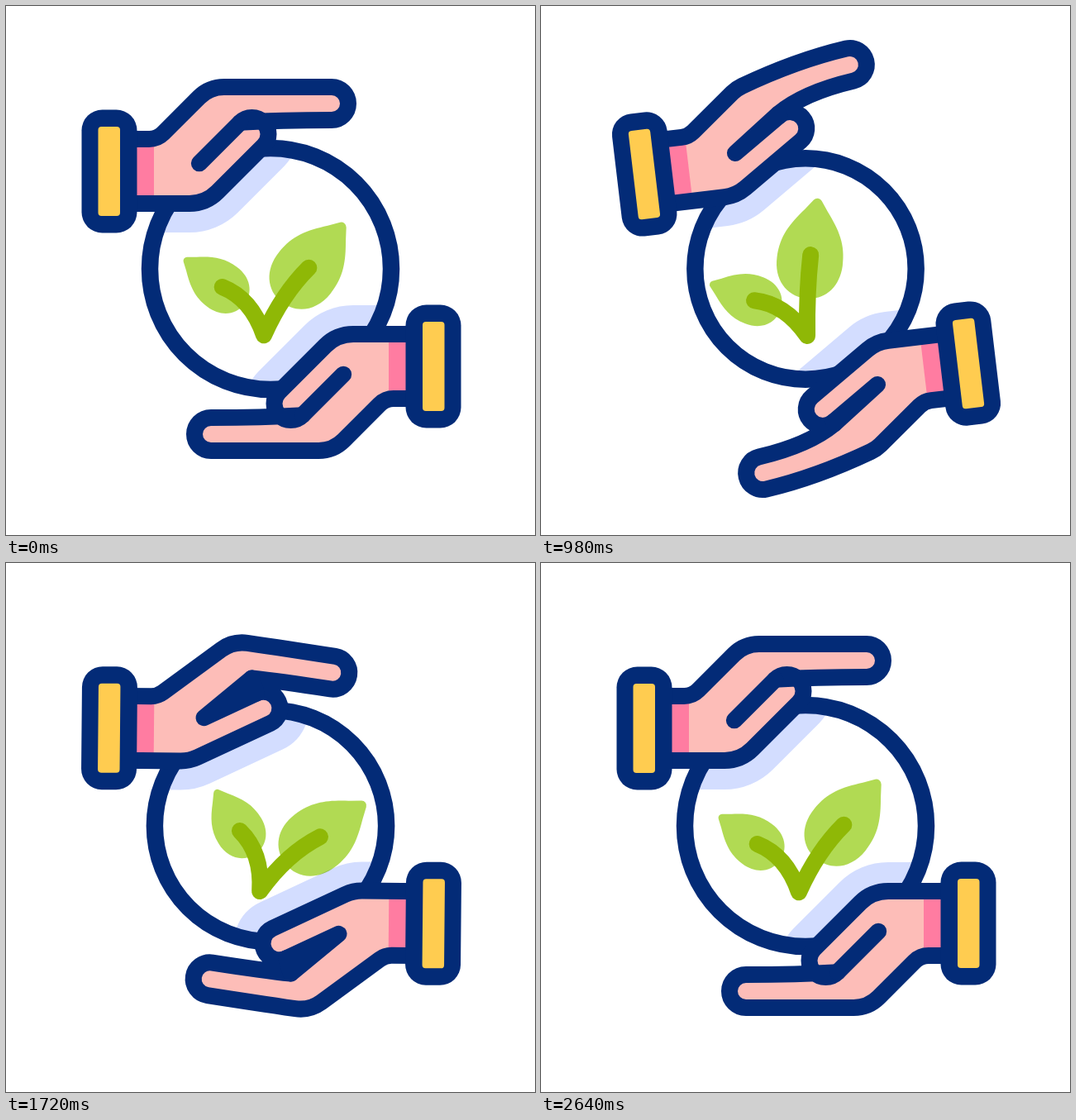
Animation, 640 px wide and 640 px high, one loop 3000 ms. Source, as an HTML page with a canvas:

```html
<!DOCTYPE html>
<html lang="en">
<head>
<meta charset="utf-8">
<title>Plant care</title>
<style>
  html, body { margin: 0; width: 100%; height: 100%; overflow: hidden; background: #fff; }
  canvas { display: block; width: 640px; height: 640px; }
</style>
</head>
<body>
<canvas id="stage" width="640" height="640"></canvas>
<script>
const ctx = document.getElementById('stage').getContext('2d');
const LOOP = 3000, STEP = 20;
const NAVY = '#032b77', SKIN = '#fdbdb8', WRIST = '#ff7ca1', CUFF = '#ffcc50';
const SHADE = '#d3ddff', LEAF = '#b1da53', STEM = '#8fb806';

const rad = deg => deg * Math.PI / 180;
const polar = (x, y, deg, r) => [x + r * Math.cos(rad(deg)), y + r * Math.sin(rad(deg))];

// Eases from one value to the next, arriving at each on its beat.
const sway = (beats, ...values) => time => {
  const i = beats.findIndex(beat => time < beat);
  if (i < 1) return values[0];
  const s = (time - beats[i - 1]) / (beats[i] - beats[i - 1]);
  return values[i - 1] + (values[i] - values[i - 1]) * s * s * (3 - 2 * s);
};

// Arms and globe lead; fingers and leaves follow and linger when lowered.
const LEAD = [200, 840, 1350, 2080, 2640];
const FOLLOW = [200, 860, 1380, 1670, 2070, 2640];
const wristAngle = sway(LEAD, 0, -10.5, 9.6, -8.2, 0);
const globeRadius = sway(LEAD, 156, 139.5, 162, 138.7, 156);
const rootX = sway(LEAD, 312, 330, 287, 326.5, 312);
const curl = sway(FOLLOW, 0, 1.25, 0.15, 0, 1, 0);
const fold = sway(FOLLOW, 0, 0, 1, 1, 0, 0);
const bigLeafAngle = sway(FOLLOW, 38.7, 0, 55, 55, 6.5, 38.7);
const smallLeafAngle = sway(FOLLOW, -53.3, -75, -29, -29, -72, -53.3);

// Curl lifts the finger, fold lowers finger and thumb.
function handShape(time) {
  const up = curl(time), down = fold(time);
  const tip = [394 - 6 * up + down, 118 - 20 * up + 14 * down];
  const tipAngle = 9 * down - 7 * up;
  const fingerTop = polar(...tip, tipAngle - 90, 20);
  const fingerBottom = polar(...tip, tipAngle + 90, 20);
  const knuckle = [246 - 2 * up + 29 * down, 98 + 12 * up - 5.5 * down];

  const base = [248, 204.5];
  const thumbAngle = -45 + 8 * up + 20 * down;
  const thumb = polar(...base, thumbAngle, 70);
  const thumbTop = polar(...thumb, thumbAngle - 90, 20);
  const web = [thumbTop[0] - 6 * down, thumbTop[1] - 19 * down];
  const [underX, underY] = polar(...base, thumbAngle + 90, 20);
  const heelX = underX + (239 - underY) / Math.tan(rad(thumbAngle));

  const outline = new Path2D();
  outline.moveTo(140, 161);
  outline.arcTo(183, 161, ...knuckle, 24);
  const bend = polar(...fingerTop, tipAngle, -62);
  outline.arcTo(...knuckle, ...bend, 43);
  outline.quadraticCurveTo(...bend, ...fingerTop);
  outline.arc(...tip, 20, rad(tipAngle - 90), rad(tipAngle + 90));
  outline.quadraticCurveTo(...polar(...fingerBottom, tipAngle, -62), ...web);
  outline.arc(...thumb, 20, rad(thumbAngle - 90), rad(thumbAngle + 90));
  outline.arcTo(heelX, 239, 140, 239, 48);
  outline.lineTo(140, 239);
  outline.closePath();

  const crease = new Path2D();
  crease.moveTo(...polar(...base, thumbAngle - 90, 20));
  crease.lineTo(...web);
  crease.lineTo(...thumbTop);
  crease.closePath();
  return { outline, crease };
}

function fill(path, color) {
  ctx.fillStyle = color;
  ctx.fill(path);
}

function stroke(path, color, width) {
  ctx.strokeStyle = color;
  ctx.lineWidth = width;
  ctx.stroke(path);
}

function box(x, y, w, h, r) {
  const path = new Path2D();
  path.roundRect(x, y, w, h, r);
  return path;
}

// Runs draw for the upper hand and again for its half-turn copy.
function forBothHands(time, draw) {
  for (const flipped of [false, true]) {
    ctx.save();
    if (flipped) {
      ctx.translate(642, 636);
      ctx.rotate(Math.PI);
    }
    ctx.translate(154, 200);
    ctx.rotate(rad(wristAngle(time)));
    ctx.translate(-154, -200);
    draw();
    ctx.restore();
  }
}

function drawHand({ outline, crease }) {
  fill(outline, SKIN);
  fill(box(145, 161, 34, 78, 0), WRIST);
  stroke(outline, NAVY, 20);
  fill(crease, NAVY);
  stroke(crease, NAVY, 20);
  fill(box(91.5, 125.5, 67, 149, 25), NAVY);
  fill(box(111.5, 146, 26.5, 108, 4), CUFF);
}

const leafShape = new Path2D();
leafShape.moveTo(-14, -54);
leafShape.arcTo(0, -73, 14, -54, 6);
leafShape.lineTo(14, -54);
leafShape.bezierCurveTo(30, -34, 40, -18, 40, 8);
leafShape.bezierCurveTo(40, 35, 23, 53, 0, 53);
leafShape.bezierCurveTo(-23, 53, -40, 35, -40, 8);
leafShape.bezierCurveTo(-40, -18, -30, -34, -14, -54);

function drawPlant(time) {
  const x = rootX(time), y = 399 - Math.max(0, 315 - x) * 0.25;
  const big = bigLeafAngle(time), small = smallLeafAngle(time);
  const sprouts = [
    { angle: big, lean: big - 5, length: 98, scale: 1, slide: 0, bend: 1.25 * big - 3, pull: 45 },
    { angle: small, lean: small + 12.5, length: 77, scale: 0.75, slide: -6, bend: small - 15, pull: 38 }
  ];
  const stems = new Path2D();
  for (const s of sprouts) {
    const end = polar(x, y, s.lean - 90, s.length);
    ctx.save();
    ctx.globalCompositeOperation = 'multiply';
    ctx.translate(...end);
    ctx.rotate(rad(s.angle));
    ctx.translate(0, s.slide);
    ctx.scale(s.scale, s.scale);
    fill(leafShape, LEAF);
    ctx.restore();
    stems.moveTo(...end);
    stems.quadraticCurveTo(...polar(...end, s.bend + 90, s.pull), x, y);
  }
  stroke(stems, STEM, 20);
}

function drawScene(time) {
  ctx.fillStyle = '#fff';
  ctx.fillRect(0, 0, 640, 640);
  ctx.lineCap = ctx.lineJoin = 'round';
  const hand = handShape(time);
  const globe = new Path2D();
  globe.arc(320, 318, globeRadius(time) - 10, 0, 2 * Math.PI);

  ctx.save();
  ctx.clip(globe);
  forBothHands(time, () => stroke(hand.outline, SHADE, 70));
  ctx.restore();
  drawPlant(time);
  stroke(globe, NAVY, 20.5);
  forBothHands(time, () => drawHand(hand));
}

const start = performance.now();
function tick() {
  const time = (performance.now() - start) % LOOP;
  drawScene(Math.floor(time / STEP) * STEP);
  requestAnimationFrame(tick);
}
tick();
</script>
</body>
</html>
```
